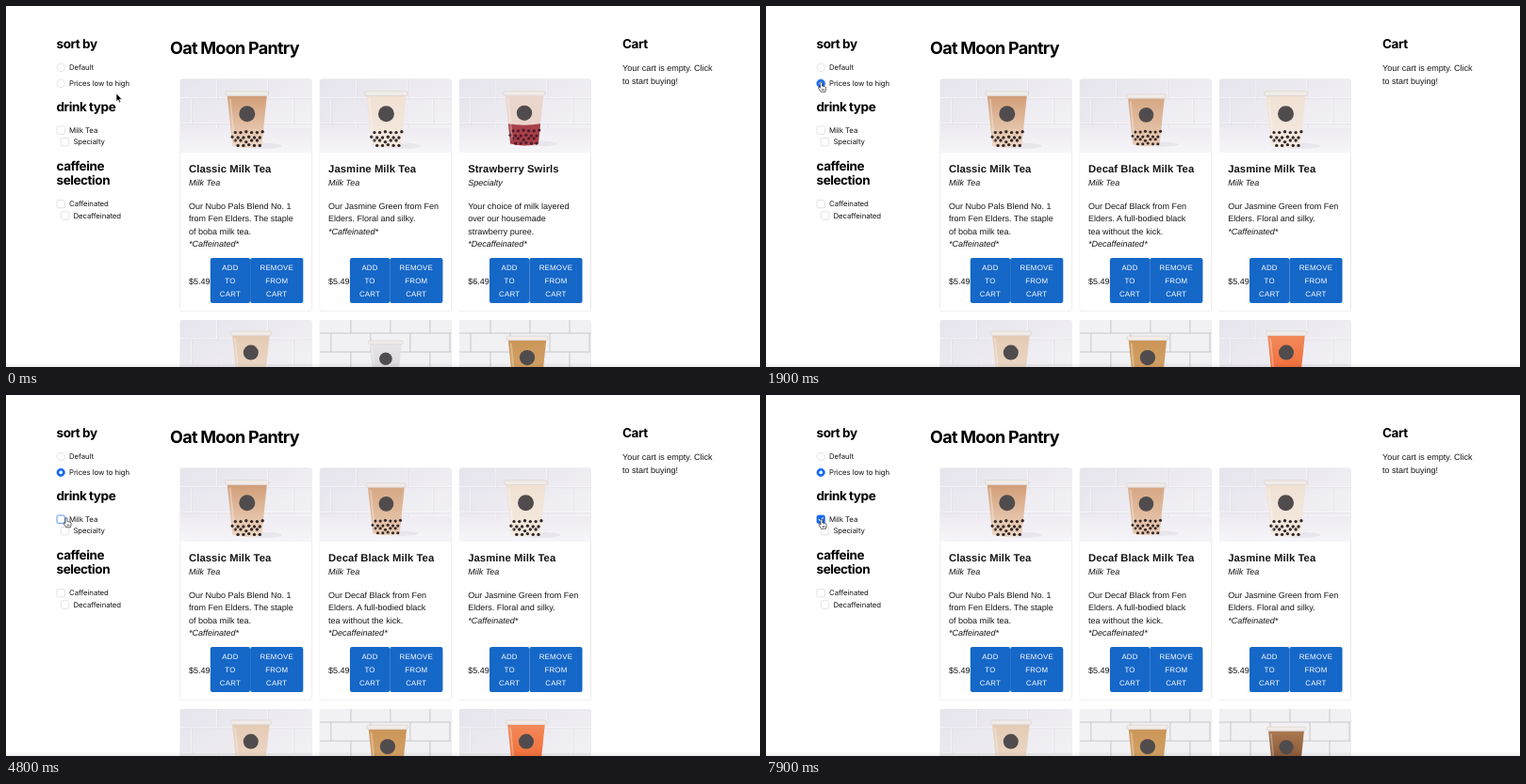
An HTML page for the animation above (8 s loop, 800 by 384 pixels).

```html
<!DOCTYPE html>
<html lang="en">
<head>
<meta charset="utf-8">
<title>Tea menu</title>
<style>
  html, body { margin: 0; width: 100%; height: 100%; overflow: hidden; background: #fff; }
  svg { display: block; width: 800px; height: 384px; }
  text { font: 9px "Liberation Sans", Arial, sans-serif; fill: #151515; white-space: pre; text-rendering: geometricPrecision; }
  .head { font: 700 13.5px Inter, sans-serif; letter-spacing: -.032em; fill: #000; }
  .title { font: 700 18px Inter, sans-serif; letter-spacing: -.04em; fill: #000; }
  .label { font: 7.8px Inter, sans-serif; letter-spacing: -.01em; }
  .name { font-size: 11.25px; font-weight: 700; letter-spacing: .0075em; }
  .it { font-style: italic; }
  .btn { font-size: 7.875px; letter-spacing: .02857em; fill: #fff; text-anchor: middle; }
  .card { fill: #fff; filter: drop-shadow(0 .8px .6px rgba(0,0,0,.32)); }
  .box { fill: #fff; stroke: #d9d9d9; stroke-width: .7; }
  .box.hover { stroke: #1668f0; }
  .box.on { fill: #1668f0; stroke: #1668f0; }
  .mark { visibility: hidden; }
  .on + .mark { visibility: visible; }
</style>
</head>
<body>
<svg id="stage" viewBox="0 0 800 384"></svg>
<script>
const LOOP = 8000, STEP = 100, SORT_AT = 1700, FILTER_AT = 5300;
const BLUE = '#1668f0';

const text = (x, y, s, cls = '') => `<text x="${x}" y="${y}" class="${cls}">${s}</text>`;
const rect = (x, y, w, h, fill, more = '') =>
  `<rect x="${x}" y="${y}" width="${w}" height="${h}" fill="${fill}" ${more}/>`;

// Cup: centre, top, scale, liquid colours, pearls, red base
const pour = (cx, top, s, upper, lower, pearls = false, puree = false) =>
  ({ cx, top, s, upper, lower, pearls, puree });

const drinks = {
  classic: { name: 'Classic Milk Tea', type: 'Milk Tea', price: '$5.49', note: '*Caffeinated*',
    lines: ['Our Nubo Pals Blend No. 1', 'from Fen Elders. The staple', 'of boba milk tea.'],
    cup: pour(71, 13, 1, '#d29e78', '#efd8c5', true) },
  decaf: { name: 'Decaf Black Milk Tea', type: 'Milk Tea', price: '$5.49', note: '*Decaffeinated*',
    lines: ['Our Decaf Black from Fen', 'Elders. A full-bodied black', 'tea without the kick.'],
    cup: pour(70.5, 16, .92, '#d6a885', '#e9cbb3', true) },
  jasmine: { name: 'Jasmine Milk Tea', type: 'Milk Tea', price: '$5.49', note: '*Caffeinated*',
    lines: ['Our Jasmine Green from Fen', 'Elders. Floral and silky.'],
    cup: pour(70.5, 13, 1, '#f0e1d3', '#f4eae1', true) },
  berry: { name: 'Strawberry Swirls', type: 'Specialty', price: '$6.49', note: '*Decaffeinated*',
    lines: ['Your choice of milk layered', 'over our housemade', 'strawberry puree.'],
    cup: pour(69, 13, .96, '#ead6cd', '#ebd2ca', true, true) },
  cream: { cup: pour(75, 12, .94, '#e4cbb5', '#eedccc') },
  clear: { tiles: true, cup: pour(70, 22, .8, '#e6e4e6', '#d3d1d4') },
  amber: { tiles: true, cup: pour(72, 17, .96, '#cb9658', '#d9a86e') },
  orange: { cup: pour(71, 12, .94, '#f2895a', '#f1632c') },
  coffee: { tiles: true, cup: pour(71, 19, .9, '#aa7850', '#704227') }
};

const boards = [
  ['classic', 'jasmine', 'berry', 'cream', 'clear', 'amber'],
  ['classic', 'decaf', 'jasmine', 'cream', 'amber', 'orange'],
  ['classic', 'decaf', 'jasmine', 'cream', 'amber', 'coffee']
];

function drawWall(tiles) {
  const high = tiles ? 20 : 27, wide = tiles ? 42 : 54;
  let d = '';
  for (let row = 0, y = tiles ? -6 : -7; y < 50; row++, y += high) {
    d += `M0 ${y}H140`;
    for (let x = row % 2 ? 12 : 12 + wide / 2; x < 140; x += wide) d += `M${x} ${y}v${high}`;
  }
  const line = (color, width, shift) =>
    `<path d="${d}" fill="none" stroke="${color}" stroke-width="${width}" transform="translate(${shift} ${shift})"/>`;
  return rect(0, 0, 140, 78.5, tiles ? '#f1f1f3' : 'url(#wall)') +
    (tiles ? line('#c3c3c8', .9, 0) : line('#f8f7fa', 1, 0) + line('#dddbe3', .6, .8)) +
    rect(0, 52, 140, 27, 'url(#table)');
}

function drawCup(id, c) {
  let pearls = '';
  for (let row = 0; row < 4; row++)
    for (let i = -3; i <= 3; i++) {
      const x = i * 5.8 + (row % 2) * 2.9 - 1, y = 43 + row * 4.6 + (i * i * 7 + row) % 3 * .8;
      if (Math.abs(x) < 17 - row) pearls += `<circle cx="${x}" cy="${y}" r="1.700"/>`;
    }
  return `<g transform="translate(${c.cx} ${c.top}) scale(${c.s})">
    <ellipse cx="15" cy="58" rx="22" ry="3" fill="#b9b2c0" opacity=".2"/>
    <path d="M-21 5L-15.500 58Q0 62 15.500 58L21 5Z" fill="url(#liquid-${id})"/>
    ${c.puree ? '<path d="M-17.800 36Q0 39 17.800 36L15.500 58Q0 62-15.500 58Z" fill="#a83f4a"/>' : ''}
    ${c.pearls ? `<g fill="${c.puree ? '#4e1c29' : '#352a29'}">${pearls}</g>` : ''}
    <path d="M-18 8L-13.500 54" stroke="#fff" stroke-width="2" opacity=".3"/>
    <rect x="-23" y="0" width="46" height="4.600" rx="2" fill="#f1ece9" stroke="#d3c9c4" stroke-width=".6"/>
    <circle cy="24" r="8.500" fill="#504c4d"/></g>`;
}

function drawButton(x, w, words) {
  return rect(x, 190.2, w, 48, '#1567c8', 'rx="2.25"') +
    words.map((s, i) => text(x + w / 2, 203.5 + i * 13.78, s, 'btn')).join('');
}

function drawCard(id, i) {
  const d = drinks[id], x = 184.8 + i % 3 * 148.1, y = i < 3 ? 77.8 : 334;
  let out = `<rect class="card" width="139.500" height="247" rx="2.25"/>
    <g clip-path="url(#photo)">${drawWall(d.tiles)}${drawCup(id, d.cup)}</g>`;
  if (d.name) {
    out += text(9.2, 99.6, d.name, 'name') + text(9.2, 113.6, d.type, 'it') +
      [...d.lines, d.note].map((s, n) =>
        text(9.2, 137.9 + n * 13.5, s, s === d.note ? 'it' : '')).join('') +
      text(9.2, 217.9, d.price) +
      drawButton(32, 42.3, ['ADD', 'TO', 'CART']) +
      drawButton(74.3, 56.2, ['REMOVE', 'FROM', 'CART']);
  }
  return `<g transform="translate(${x} ${y})">${out}</g>`;
}

const radio = (id, y, s) =>
  `<circle id="${id}" class="box" cx="58.200" cy="${y}" r="4.200"/>
   <circle class="mark" cx="58.200" cy="${y}" r="1.800" fill="#fff"/>` + text(67, y + 2.8, s, 'label');

const check = (id, x, y, s) =>
  `<rect id="${id}" class="box" x="${x}" y="${y}" width="8.400" height="8.400" rx="1.500"/>
   <path class="mark" d="M${x + 2} ${y + 4.2}l1.700 1.800 2.900-3.600" fill="none" stroke="#fff" stroke-width="1.100"/>` +
  text(x + 13.1, y + 7, s, 'label');

const gradient = (id, a, b, slant = 0) => `<linearGradient id="${id}" x2="${slant}" y2="1">
  <stop stop-color="${a}"/><stop offset="1" stop-color="${b}"/></linearGradient>`;

const $ = id => document.getElementById(id);
$('stage').innerHTML = `<defs>
    ${gradient('wall', '#e6e4ec', '#f5f4f7', 1)}${gradient('table', '#eeecf2', '#f6f5f8')}
    ${gradient('edge', '#fff', '#efefef')}
    ${Object.entries(drinks).map(([id, d]) => gradient('liquid-' + id, d.cup.upper, d.cup.lower)).join('')}
    <clipPath id="photo"><path d="M0 78.300V2.250Q0 0 2.250 0H137.250Q139.500 0 139.500 2.250V78.300Z"/></clipPath>
  </defs>` +
  rect(0, 0, 800, 384, '#fff') +
  text(53.5, 45.4, 'sort by', 'head') + radio('default', 65.5, 'Default') +
  radio('price', 82.4, 'Prices low to high') +
  text(53.5, 112.2, 'drink type', 'head') + check('milk', 54, 128, 'Milk Tea') +
  check('special', 58.3, 140.4, 'Specialty') +
  text(53.5, 174.8, 'caffeine', 'head') + text(53.5, 190.4, 'selection', 'head') +
  check('caf', 54, 206.4, 'Caffeinated') + check('decaf', 58.4, 218.8, 'Decaffeinated') +
  text(174, 50.8, 'Oat Moon Pantry', 'title') + text(654, 45.4, 'Cart', 'head') +
  text(654, 69.2, 'Your cart is empty. Click') + text(654, 82.6, 'to start buying!') +
  boards.map((b, i) => `<g id="board${i}">${b.map(drawCard).join('')}</g>`).join('') +
  rect(0, 379, 800, 5, 'url(#edge)', 'style="mix-blend-mode:multiply"') +
  `<rect id="wave" fill="none" stroke="${BLUE}"/>
  <g id="cursor" stroke-linejoin="round">
    <path id="arrow" d="M0 0V8.500L2 6.800 3.300 9.700 4.700 9.100 3.400 6.200H6.100Z" fill="#000" stroke="#fff" stroke-width=".6"/>
    <path id="hand" d="M-1 .500a1 1 0 0 1 2 0V3.500L4 4.200Q5.400 4.600 5.200 6L4.500 9.800H-.300L-2.700 6.200Q-3.300 5-2.300 4.700L-1 5.600ZM1.200 6.500v2M2.800 6.500v2" fill="#fff" stroke="#222" stroke-width=".7"/>
  </g>`;

// time, x, y of the pointer tip
const path = [
  [0, 117, 93], [200, 117, 93], [700, 61, 66], [1000, 58.5, 66], [1300, 58.5, 81.5],
  [3900, 58.5, 81.5], [4500, 66, 129], [4700, 64, 131], [4900, 64, 131], [5100, 59, 132.5], [LOOP, 59, 132.5]
];
// hover areas: x, y, width, height
const zones = {
  default: [53, 60, 42, 11], price: [53, 77, 79, 11],
  milk: [53, 127, 45, 11], special: [57, 140, 48, 10]
};

function pointer(t) {
  const i = path.findIndex(p => p[0] > t), [t0, x0, y0] = path[i - 1], [t1, x1, y1] = path[i];
  const u = (t - t0) / (t1 - t0), k = u * u * (3 - 2 * u);
  return [x0 + (x1 - x0) * k, y0 + (y1 - y0) * k];
}

function setWave(t) {
  const milk = t >= FILTER_AT, age = (t - (milk ? FILTER_AT : SORT_AT)) / 500;
  const grow = Math.min(Math.max(age, 0), 1) * 1.2, size = 8.4 + 2 * grow;
  const at = { x: 54 - grow, y: (milk ? 128 : 78.2) - grow, width: size, height: size,
    rx: milk ? 2 : size / 2, opacity: age > 0 && age < 1 ? .35 * (1 - age) : 0 };
  for (const k in at) $('wave').setAttribute(k, at[k]);
}

function draw(now) {
  const t = Math.floor(now % LOOP / STEP) * STEP, [x, y] = pointer(t);
  const board = t < SORT_AT ? 0 : t < FILTER_AT ? 1 : 2;
  boards.forEach((_, i) => $('board' + i).style.display = i === board ? '' : 'none');
  let over = false;
  for (const [id, [zx, zy, w, h]] of Object.entries(zones)) {
    const inside = x >= zx && x <= zx + w && y >= zy && y <= zy + h;
    $(id).classList.toggle('hover', inside);
    over = over || inside;
  }
  $('price').classList.toggle('on', t >= SORT_AT);
  $('milk').classList.toggle('on', t >= FILTER_AT);
  setWave(t);
  $('cursor').setAttribute('transform', `translate(${x} ${y})`);
  $('hand').style.display = over ? '' : 'none';
  $('arrow').style.display = over ? 'none' : '';
}

function loop() {
  draw(performance.now());
  requestAnimationFrame(loop);
}
loop();
</script>
</body>
</html>
```
